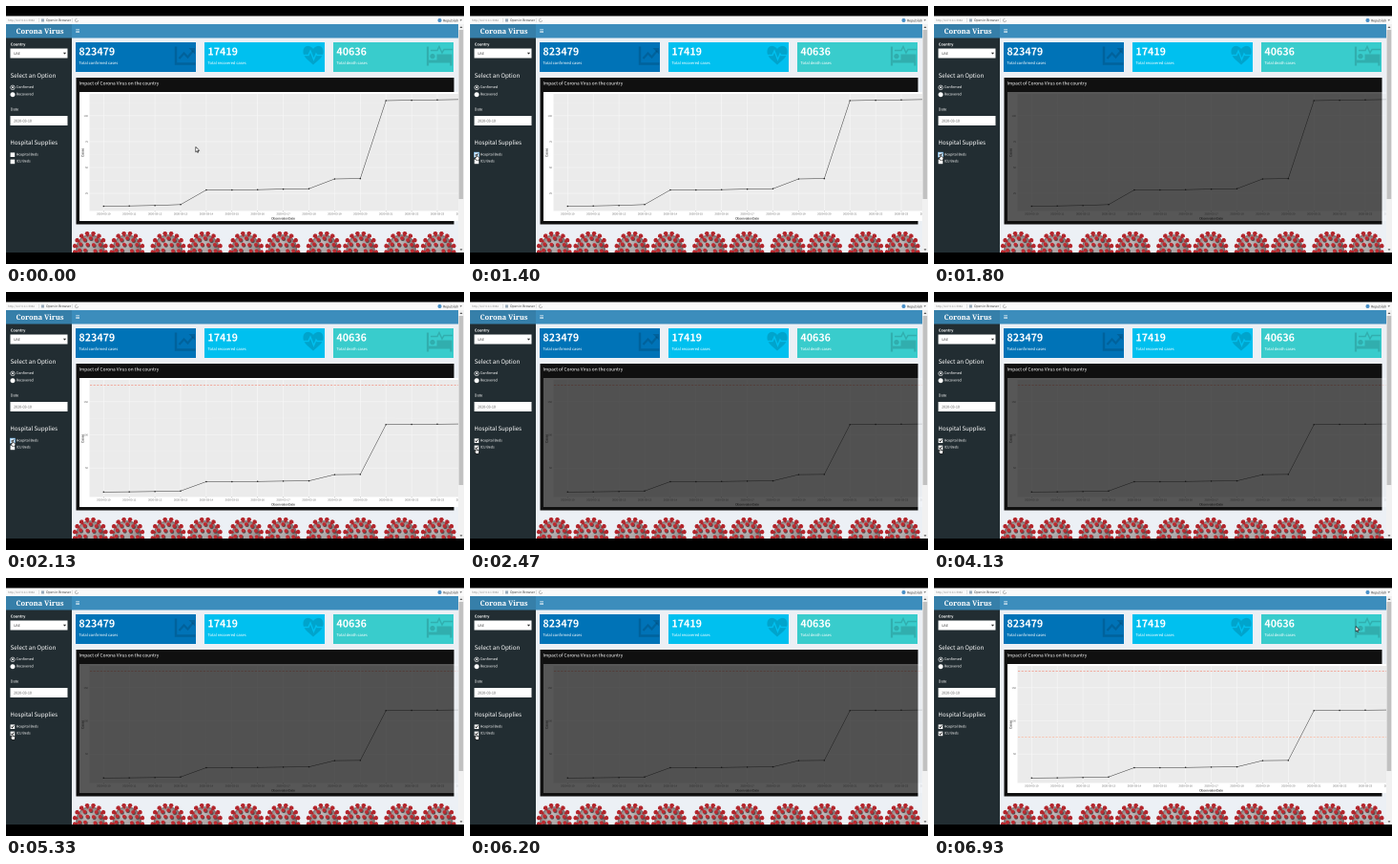
An HTML page with a canvas for the animation above (6990 ms loop, 480 by 270 pixels).

```html
<!DOCTYPE html>
<html lang="en">
<head>
<meta charset="utf-8">
<title>Dashboard</title>
<style>
html, body { margin: 0; width: 100%; height: 100%; overflow: hidden; background: #000; }
canvas { display: block; width: 480px; height: 270px; }
</style>
</head>
<body>
<canvas id="stage" width="960" height="540"></canvas>
<script>
// Drawn at double size so that the tiny lettering stays smooth.
const ctx = document.getElementById('stage').getContext('2d');
ctx.scale(2, 2);
ctx.textRendering = 'geometricPrecision';
const LOOP = 6990;
const SANS = '"Noto Sans CJK SC", "Noto Sans CJK JP", "Noto Sans", sans-serif';
const PLOT = '"Liberation Sans", sans-serif';
const PAGE = '#ecf0f5', PANEL = '#101010';

function rect(x, y, w, h, color) {
  ctx.fillStyle = color;
  ctx.fillRect(x, y, w, h);
}
function text(str, x, y, size, color, { weight = 400, family = SANS, align = 'left' } = {}) {
  ctx.font = `${weight} ${size}px ${family}`;
  ctx.textAlign = align;
  ctx.fillStyle = color;
  ctx.fillText(str, x, y);
}
function line(points, color, width = 1) {
  ctx.beginPath();
  points.forEach(([x, y]) => ctx.lineTo(x, y));
  ctx.strokeStyle = color;
  ctx.lineWidth = width;
  ctx.stroke();
}
function shape(points, color) {
  ctx.beginPath();
  points.forEach(([x, y]) => ctx.lineTo(x, y));
  ctx.fillStyle = color;
  ctx.fill();
}
function dot(x, y, r, color) {
  ctx.beginPath();
  ctx.arc(x, y, r, 0, 2 * Math.PI);
  ctx.fillStyle = color;
  ctx.fill();
}
const progress = (t, from, to) => Math.min(1, Math.max(0, (t - from) / (to - from)));
const smooth = p => p * p * (3 - 2 * p);

// ---- Window frame and header ----
function drawFrame() {
  rect(0, 0, 480, 270, '#000');
  rect(0, 10.5, 480, 8.5, '#fafafa');
  text('http://127.0.0.1:5982', 2, 16, 2.9, '#888');
  line([[34.5, 12.5], [34.5, 17]], '#ccc', 0.5);
  rect(37, 13.5, 3, 3, '#9ab');
  text('Open in Browser', 42, 16.2, 3.4, '#444');
  line([[69.5, 12.5], [69.5, 17]], '#ccc', 0.5);
  ctx.beginPath();
  ctx.arc(74, 15, 1.5, 0, 5);
  ctx.strokeStyle = '#999';
  ctx.lineWidth = 0.6;
  ctx.stroke();
  dot(454.5, 15, 2, '#4a90c8');
  text('Republish', 458, 16.3, 3.5, '#333');
  shape([[475.5, 14.3], [478, 14.3], [476.75, 15.8]], '#666');

  rect(0, 19, 69, 14.5, '#367fa9');
  rect(69, 19, 405, 14.5, '#3c8dbc');
  text('Corona Virus', 35.5, 29, 7.5, '#fff',
    { weight: 700, family: '"Noto Serif", serif', align: 'center' });
  for (let y = 24.5; y < 28; y += 1.4) rect(73.2, y, 3.8, 0.6, '#fff');
  rect(69, 33.5, 405, 224.5, PAGE);
  rect(474, 19, 6, 239, '#f1f1f1');
  rect(474.6, 25, 4.6, 177, '#c1c1c1');
  shape([[475.5, 23], [478.5, 23], [477, 21.2]], '#555');
  shape([[475.5, 254.3], [478.5, 254.3], [477, 256]], '#555');
}

// ---- Sidebar ----
function checkbox(y, label, checked, focused) {
  if (focused) rect(4, y - 3, 5.8, 5.8, '#6fb3e6');
  rect(4.6, y - 2.4, 4.6, 4.6, focused ? '#d5e9f8' : '#fff');
  if (checked) line([[5.5, y - 0.2], [6.5, y + 1], [8.4, y - 1.4]], '#222', 0.8);
  text(label, 10.7, y + 0.5, 3.6, '#fff');
}
function radio(y, label, selected) {
  dot(7, y, 2.5, '#fff');
  if (selected) {
    dot(7, y, 1.9, '#222d32');
    dot(7, y, 1, '#fff');
  }
  text(label, 10.8, y + 0.7, 3.7, '#fff');
}
function drawSidebar(t) {
  rect(0, 33.5, 69, 224.5, '#222d32');
  text('Country', 4.8, 41.6, 3.9, '#fff', { weight: 700 });
  rect(4.5, 44.5, 60, 10, '#fff');
  text('UAE', 8, 51.1, 3.6, '#444');
  shape([[59.9, 48.7], [63.1, 48.7], [61.5, 50.6]], '#222');
  text('Select an Option', 4.6, 75, 6.2, '#fff');
  radio(85.3, 'Confirmed', true);
  radio(92.7, 'Recovered', false);
  text('Date', 4.8, 109.3, 3.9, '#fff');
  rect(4.5, 115, 60, 10, '#fff');
  text('2020-03-10', 8, 121.3, 3.7, '#555');
  text('Hospital Supplies', 4.4, 145.1, 6.1, '#fff');
  checkbox(155.8, 'Hospital Beds', t >= 1330, t >= 1330 && t < 2330);
  checkbox(163, 'ICU Beds', t >= 2330, false);
}

// ---- Value boxes ----
const ICON = 'rgba(0,0,0,.15)';
function chartIcon() {
  line([[178, 42.5], [178, 60.5], [198.5, 60.5]], ICON, 2.4);
  line([[181.5, 55], [186.5, 49.5], [190.5, 53.5], [196, 47]], ICON, 2.2);
  shape([[191.5, 44], [198, 44], [198, 50.5]], ICON);
}
function heartIcon(color) {
  ctx.beginPath();
  ctx.moveTo(322, 61.5);
  ctx.bezierCurveTo(316, 56, 311, 53, 311.5, 47);
  ctx.bezierCurveTo(312, 40.5, 319, 40.5, 322, 45);
  ctx.bezierCurveTo(325, 40.5, 332, 40.5, 332.5, 47);
  ctx.bezierCurveTo(333, 53, 328, 56, 322, 61.5);
  ctx.fillStyle = ICON;
  ctx.fill();
  line([[311, 51.5], [317, 51.5], [319, 47], [322.5, 56], [325, 50], [326, 51.5], [333, 51.5]], color, 1.4);
}
function bedIcon() {
  line([[442, 42.5], [442, 62.5]], ICON, 2.2);
  line([[443.1, 58], [467.5, 58]], ICON, 3);
  rect(465.3, 59.5, 2.2, 3, ICON);
  dot(447, 52.6, 2.7, ICON);
  rect(451.5, 50.5, 16, 6, ICON);
  line([[445, 46.5], [452, 46.5], [454, 42.5], [457, 49], [459, 45.5], [468, 45.5]], ICON, 1.4);
}
function valueBox(x, color, value, label, icon) {
  rect(x, 38, 126, 31, color);
  icon(color);
  text(value, x + 3.4, 51.3, 10.7, '#fff', { weight: 700 });
  text(label, x + 3.4, 61.2, 4.05, '#fff');
}
function drawValueBoxes() {
  valueBox(73, '#0073b7', '823479', 'Total confirmed cases', chartIcon);
  valueBox(208, '#00c0ef', '17419', 'Total recovered cases', heartIcon);
  valueBox(343, '#39cccc', '40636', 'Total death cases', bedIcon);
}

// ---- Chart ----
const CASES = [209.5, 209.2, 208.7, 207.8, 192.5, 192.5, 192.2, 191.6, 191.2,
  181, 180.6, 99, 98.6, 98.2, 97.8];
const dateX = i => 102.3 + 26.9 * i;

function threshold(y, color) {
  ctx.setLineDash([2.2, 1.4]);
  line([[88, y], [474, y]], color, 0.65);
  ctx.setLineDash([]);
}
// lines: how many supply thresholds the plot carries
function drawPlot(lines) {
  rect(77, 90, 397, 135, '#fff');
  rect(87.5, 92, 386.5, 122.5, '#ebebeb');

  const scaled = lines > 0;
  const labels = scaled ? ['150', '100', '50'] : ['100', '75', '50', '25'];
  const step = scaled ? 34.7 : 27.1;
  labels.forEach((label, i) => {
    const y = 114.8 + i * step;
    line([[87.5, y], [474, y]], '#f8f8f8', 0.6);
    line([[87.5, y - step / 2], [474, y - step / 2]], '#f2f2f2', 0.4);
    text(label, 86, y + 1, 2.7, '#666', { family: PLOT, align: 'right' });
  });
  CASES.forEach((_, i) => {
    const x = dateX(i);
    line([[x, 92], [x, 214.5]], '#f8f8f8', 0.6);
    line([[x, 214.5], [x, 215.3]], '#555', 0.4);
    text(`2020-03-${10 + i}`, x, 218.7, 2.8, '#666', { family: PLOT, align: 'center' });
  });
  text('ObservationDate', 290.5, 223.3, 3.35, '#111', { family: PLOT, align: 'center' });
  ctx.save();
  ctx.translate(81.3, 153.5);
  ctx.rotate(-Math.PI / 2);
  text('Cases', 0, 0, 3.3, '#111', { family: PLOT, align: 'center' });
  ctx.restore();

  if (lines > 0) threshold(97.3, '#f28470');
  if (lines > 1) threshold(166.3, '#f9ad90');
  const points = CASES.map((y, i) => [dateX(i), scaled ? 209.3 - (209.5 - y) * 0.638 : y]);
  line(points, '#333', 0.5);
  points.forEach(([x, y]) => dot(x, y, 0.75, '#222'));
}
function drawChart(t) {
  const lines = t < 2070 ? 0 : t < 6330 ? 1 : 2;
  const dim = t < 2070 ? progress(t, 1530, 1760) : t < 6330 ? progress(t, 2200, 2420) : 0;
  rect(73.5, 75, 396, 153.5, PANEL);
  text('Impact of Corona Virus on the country', 76.5, 82.7, 4.75, '#fff');
  ctx.save();
  ctx.beginPath();
  ctx.rect(77, 90, 397, 135);
  ctx.clip();
  drawPlot(lines);
  // A recalculating plot fades to 30% over whatever lies behind it.
  ctx.globalAlpha = 0.7 * smooth(dim);
  rect(77, 90, 392.5, 135, PANEL);
  rect(469.5, 90, 4.5, 135, PAGE);
  ctx.restore();
}

// ---- Row of viruses ----
function spike(cx, cy, angle) {
  const at = (r, a) => [cx + r * Math.cos(angle + a), cy + r * Math.sin(angle + a)];
  shape([at(13, 0.04), at(17, 0.15), at(18.6, 0.06), at(18.6, -0.06), at(17, -0.15), at(13, -0.04)], '#b3262c');
}
function virus(cx, cy) {
  const body = ctx.createRadialGradient(cx - 3, cy - 6, 2, cx, cy, 15.5);
  body.addColorStop(0, '#bdb9ba');
  body.addColorStop(0.7, '#98908f');
  body.addColorStop(1, '#6f6465');
  dot(cx, cy, 15.2, body);
  for (let i = 0; i < 16; i++) spike(cx, cy, (i + 0.5) / 16 * 2 * Math.PI);
  [[11.3, 11], [5.5, 5]].forEach(([r, n]) => {
    for (let i = 0; i < n; i++) {
      const a = (i + 0.3) / n * 2 * Math.PI;
      const x = cx + r * Math.cos(a), y = cy + r * Math.sin(a);
      dot(x + 0.8, y + 1, 2, '#5e4a4b');
      dot(x, y, 1.9, '#bf2a30');
    }
  });
}
function drawViruses() {
  ctx.save();
  ctx.beginPath();
  ctx.rect(69, 234.5, 405, 23.5);
  ctx.clip();
  for (let i = 0; i < 5; i++) {
    virus(88.3 + 81.6 * i, 254.3);
    virus(126.8 + 81.6 * i, 254.3);
  }
  ctx.restore();
}

// ---- Mouse pointer ----
const MOVES = [[400, 1070, 6.3, 155.5], [2130, 2270, 6, 163.3], [6600, 6930, 442, 50.5]];
const ARROW = [[0, 0], [0, 5.4], [1.2, 4.4], [2, 6.1], [2.9, 5.7], [2.2, 4], [3.8, 3.9], [0, 0]];
const HAND = [[0, 0], [0, 3.3], [-1.1, 2.8], [-1.2, 3.6], [0.4, 6], [3, 6], [3.6, 2.8], [1.2, 2.2], [1.1, 0], [0, 0]];
function drawPointer(t) {
  let x = 198.8, y = 147.3;
  for (const [from, to, toX, toY] of MOVES) {
    const p = smooth(progress(t, from, to));
    x += (toX - x) * p;
    y += (toY - y) * p;
  }
  const overCheckbox = x < 12;
  const outline = (overCheckbox ? HAND : ARROW).map(([dx, dy]) => [x + dx, y + dy]);
  shape(outline, '#fff');
  line(outline, '#222', 0.6);
}

function draw(t) {
  drawFrame();
  drawSidebar(t);
  drawValueBoxes();
  drawChart(t);
  drawViruses();
  drawPointer(t);
}
const start = performance.now();
function tick() {
  draw((performance.now() - start) % LOOP);
  requestAnimationFrame(tick);
}
tick();
</script>
</body>
</html>
```
